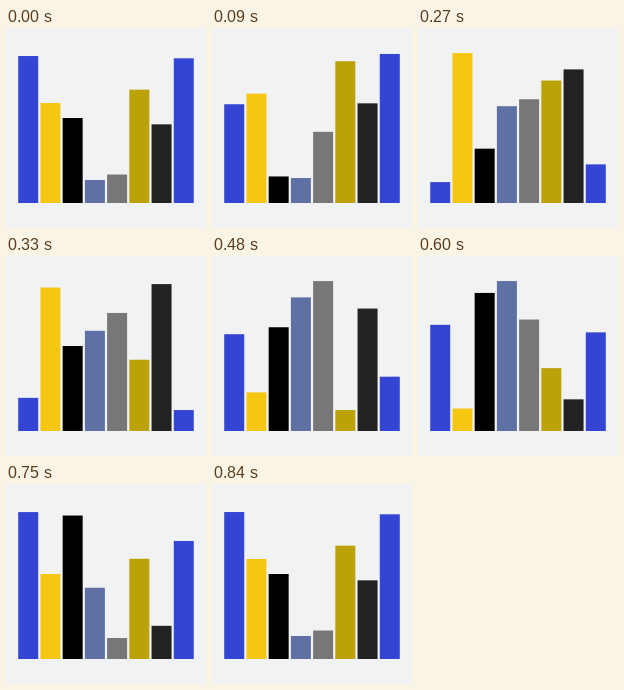
Write an HTML page that moves like this. It is 200 px wide and 200 px high and loops after 870 ms.

```html
<!DOCTYPE html>
<html>
<head>
<meta charset="utf-8">
<title>Bars</title>
<style>
html, body { margin: 0; width: 100%; height: 100%; overflow: hidden; background: #f1f2f3; }
svg { display: block; width: 100%; height: 100%; }
</style>
</head>
<body>
<svg id="stage" viewBox="0 0 200 200"></svg>
<script>
const STEP = 30, FRAMES = 29, CYCLE = 840;
const BASE = 175, WIDTH = 20, PITCH = 200 / 9;
const LEVELS = [20, 100, 150];
const LEAD = 70; // time since the lowest level for a bar with no delay

// colour and delay, in eighths of a cycle
const BARS = [
  ['#3445d3', 3], ['#f5c713', 6], ['#000000', 2], ['#5f70a4', 1],
  ['#777777', 0], ['#bba209', 5], ['#222222', 7], ['#3445d3', 4]
];

const stage = document.getElementById('stage');
const rects = BARS.map(([fill], i) => {
  const r = document.createElementNS('http://www.w3.org/2000/svg', 'rect');
  r.setAttribute('x', PITCH * (i + 1) - WIDTH / 2);
  r.setAttribute('width', WIDTH);
  r.setAttribute('fill', fill);
  return stage.appendChild(r);
});

// cubic-bezier(.5, 0, .5, 1)
function ease(x) {
  let lo = 0, hi = 1;
  for (let i = 0; i < 24; i++) {
    const s = (lo + hi) / 2;
    if (1.5 * s * (1 - s) + s * s * s < x) lo = s; else hi = s;
  }
  return lo * lo * (3 - 2 * lo);
}

function height(t) {
  const n = LEVELS.length;
  const p = ((t % CYCLE + CYCLE) % CYCLE) / CYCLE * n;
  const k = Math.floor(p);
  const from = LEVELS[k], to = LEVELS[(k + 1) % n];
  return from + (to - from) * ease(p - k);
}

function draw(ms) {
  const t = Math.floor(ms / STEP) % FRAMES * STEP;
  rects.forEach((r, i) => {
    const h = height(t + LEAD - BARS[i][1] * CYCLE / 8);
    r.setAttribute('y', BASE - h);
    r.setAttribute('height', h);
  });
}

const start = performance.now();
function tick() {
  draw(performance.now() - start);
  requestAnimationFrame(tick);
}
tick();
</script>
</body>
</html>
```
